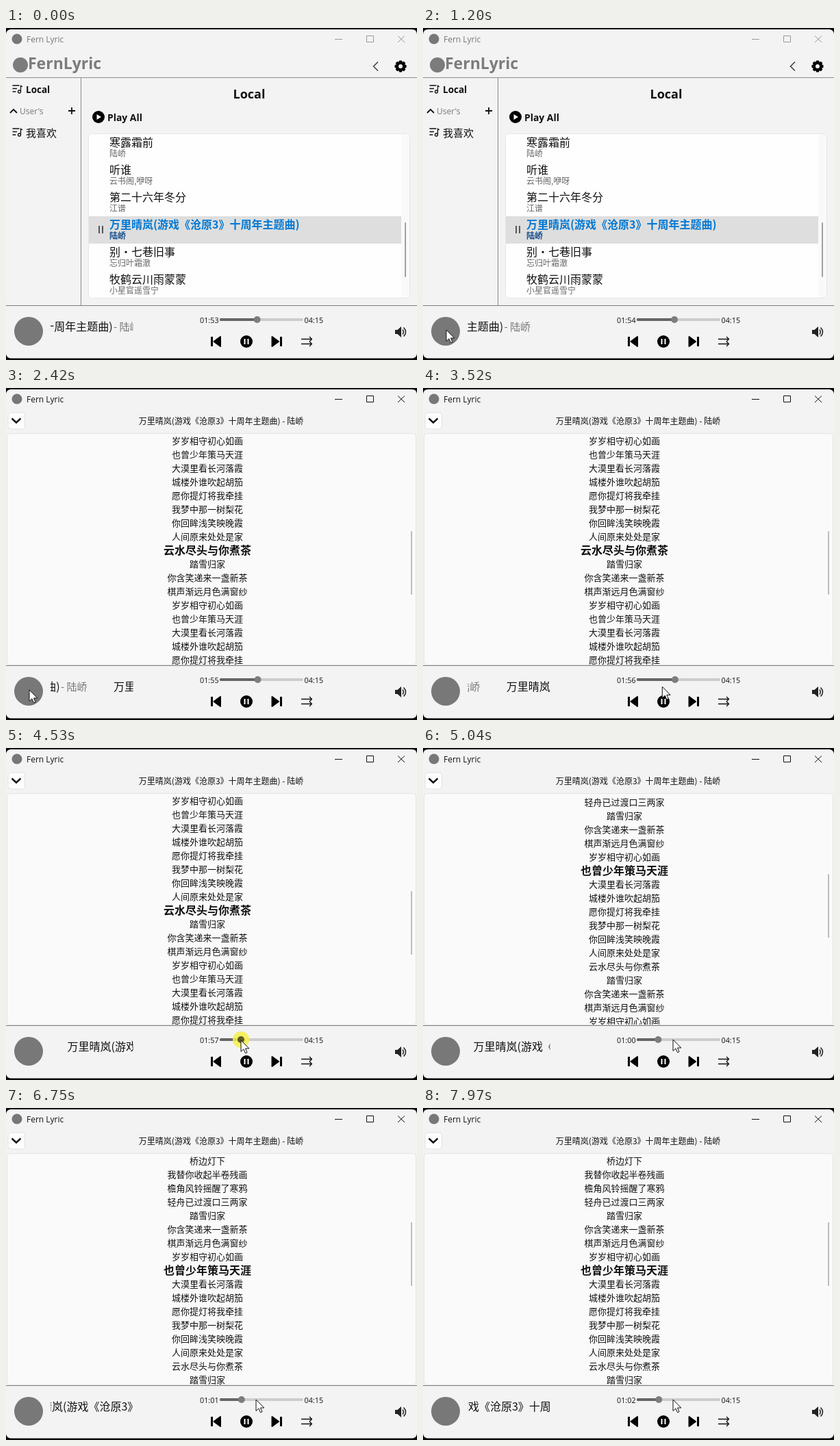
These frames come from a looping animation (600 by 485 pixels, 8000 ms). An HTML page:

```html
<!DOCTYPE html>
<html lang="zh">
<head>
<meta charset="utf-8">
<title>Fern Lyric</title>
<style>
html, body { margin: 0; width: 100%; height: 100%; overflow: hidden; background: #0b0b0b; }
svg { display: block; width: 600px; height: 485px; }
text { font-family: "Open Sans", "Noto Sans CJK SC", "Noto Sans CJK", sans-serif; fill: #111; white-space: pre; }
.cjk { font-family: "Noto Sans CJK SC", "Noto Sans CJK", sans-serif; }
.b { font-weight: 700; }
.mid { text-anchor: middle; }
.line { fill: none; stroke: #111; stroke-width: 1.3; }
</style>
</head>
<body>
<svg viewBox="0 0 600 485">
  <defs>
    <clipPath id="lyricClip"><rect x="1" y="67" width="598" height="337"/></clipPath>
    <clipPath id="nameClip"><rect x="65" y="422" width="120.500" height="34"/></clipPath>
    <g id="listIcon">
      <path class="line" d="M0 1H10M0 5.500H6.500M0 10H5M12 9.500V0.500Q12 2.500 14.500 2.500"/>
      <circle class="line" cx="10" cy="10" r="2"/>
    </g>
  </defs>

  <rect y="2" width="600" height="480.500" rx="7" fill="#f3f3f3"/>
  <circle cx="16" cy="16" r="7.500" fill="#777"/>
  <text id="caption" x="30" y="21" font-size="12">Fern Lyric</text>
  <path id="winBtns" fill="none" d="M480 16.500H491M526.500 11.500H536.500V20.500H526.500ZM572 11.500L582 21M582 11.500L572 21"/>

  <g id="home">
    <circle cx="21" cy="54" r="11" fill="#7c7c7c"/>
    <text x="32" y="60" font-size="23" class="b" style="fill:#7c7c7c">FernLyric</text>
    <path d="M543 49.500L536.500 56L543 62.500" fill="none" stroke="#444" stroke-width="1.600"/>
    <g id="gear" transform="translate(576 56)"></g>
    <path d="M0 72.500H600M109.500 72.500V405" fill="none" stroke="#8c8c8c"/>

    <use href="#listIcon" x="9.500" y="83"/>
    <text x="29" y="95" font-size="13.500" class="b">Local</text>
    <path d="M6 124L11 119L16 124" fill="none" stroke="#111" stroke-width="1.800"/>
    <text x="20" y="126" font-size="12" style="fill:#777">User's</text>
    <path d="M91 121H101M96 116V126" stroke="#111" stroke-width="1.800"/>
    <use href="#listIcon" x="9.500" y="146"/>
    <text x="29" y="158.500" font-size="15" class="cjk" font-weight="500">我喜欢</text>

    <text x="355" y="103" font-size="18" class="b mid">Local</text>
    <circle cx="135" cy="130" r="9"/>
    <path d="M132.500 126V134L139 130Z" fill="#fff"/>
    <text x="148" y="136" font-size="13.900" class="b">Play All</text>
    <rect x="120.500" y="154.500" width="469" height="240" rx="4" fill="#fefefe" stroke="#e6e6e6"/>
    <rect x="577" y="155" width="12" height="239" rx="3" fill="#f9f9f9"/>
    <rect x="121" y="275" width="456" height="40" fill="#dedede"/>
    <path d="M136 289V300M141 289V300" stroke="#555" stroke-width="2"/>
    <g id="songs"></g>
    <rect x="582" y="284" width="2" height="80" rx="1" fill="#a0a0a0"/>
  </g>

  <g id="lyricPage">
    <rect x="3" y="36" width="24.500" height="24" rx="4" fill="#fdfdfd" stroke="#dcdcdc" stroke-width=".8"/>
    <path d="M8.500 44.500L15 50.500L21.500 44.500" fill="none" stroke="#111" stroke-width="2.400"/>
    <text id="heading" x="314" y="52.500" font-size="12" class="cjk mid"></text>
    <rect x="1.500" y="66.500" width="597" height="338" rx="4" fill="#fafafa" stroke="#e4e4e4"/>
    <g id="rows" clip-path="url(#lyricClip)"></g>
    <rect id="thumb" x="591" width="2" height="93" rx="1" fill="#bcbcbc"/>
  </g>

  <path d="M0 405.500H600" stroke="#7c7c7c"/>
  <circle cx="33" cy="443" r="21" fill="#787878"/>
  <g clip-path="url(#nameClip)"><g id="names"></g></g>

  <text id="now" x="283" y="430.500" font-size="10.800"></text>
  <text x="435.500" y="430.500" font-size="10.800">04:15</text>
  <rect x="312" y="424" width="122" height="4" rx="1.500" fill="#cdcdcd"/>
  <rect id="fill" x="312" y="424" height="4" rx="1.500" fill="#666"/>
  <circle id="spot" r="12" fill="#f6ee4a" opacity=".85"/>
  <circle id="knob" cy="426" r="5" fill="#7d7d7d"/>

  <g stroke="#000" stroke-linejoin="round">
    <path d="M300.500 451V465" stroke-width="3"/>
    <path d="M313 451V465L303.500 458Z" stroke-width="2"/>
    <path d="M388.500 451V465L398 458Z" stroke-width="2"/>
    <path d="M401.500 451V465" stroke-width="3"/>
  </g>
  <circle cx="351" cy="458" r="9"/>
  <path d="M348.500 454V462M353.500 454V462" stroke="#fff" stroke-width="2"/>
  <path class="line" d="M431 454.500H446.500M443 451L446.500 454.500L443 458M431 461.500H446.500M443 458L446.500 461.500L443 465"/>
  <path d="M568 441H571.500L577 436V452L571.500 447H568Z" fill="#222"/>
  <path d="M579 440.500Q581.500 444 579 447.500M580.500 437.500Q586.500 444 580.500 450.500" fill="none" stroke="#222" stroke-width="1.500"/>
  <path id="cursor" d="M0 0V16.500L3.900 12.900L6.500 18.800L9 17.700L6.500 12H11.800Z" fill="#fff" stroke="#111" stroke-width="1"/>
</svg>
<script>
const LOOP = 8000;
const song = "万里晴岚(游戏《沧原3》十周年主题曲)";
const singer = "陆峤";
const songs = [
  ["寒露霜前", singer], ["听谁", "云书阁,咿呀"], ["第二十六年冬分", "江谱"],
  [song, singer], ["别·七巷旧事", "忘归叶霜澈"], ["牧鹤云川雨蒙蒙", "小星官遥雪宁"]
];
const lyrics = ["桥边灯下", "我替你收起半卷残画", "檐角风铃摇醒了寒鸦", "轻舟已过渡口三两家",
  "踏雪归家", "你含笑递来一盏新茶", "棋声渐远月色满窗纱", "岁岁相守初心如画",
  "也曾少年策马天涯", "大漠里看长河落霞", "城楼外谁吹起胡笳", "愿你提灯将我牵挂",
  "我梦中那一树梨花", "你回眸浅笑映晚霞", "人间原来处处是家", "云水尽头与你煮茶"];
const REFRAIN = 12, ROWS = 26;

// Pointer path: time, x, y
const path = [[300, 30, 500], [550, 30, 484], [950, 34, 441], [3150, 34, 441], [3420, 326, 445],
  [3640, 372, 428], [4230, 370, 427], [4430, 343, 427], [4750, 343, 427], [5040, 365, 426]];
// Clock ticks: time, seconds played
const ticks = [[0, 113], [800, 114], [1850, 115], [2850, 116], [3850, 117], [4930, 60], [6240, 61], [7250, 62]];
const SWITCH = 1500, FOCUS = 1300, GRAB = 4320, SEEK = 4930;

const $ = id => document.getElementById(id);
function make(parent, tag, attrs, content = "") {
  const el = document.createElementNS("http://www.w3.org/2000/svg", tag);
  set(el, attrs);
  el.textContent = content;
  parent.appendChild(el);
  return el;
}
function set(el, attrs) {
  for (const k in attrs) el.setAttribute(k, attrs[k]);
}
const show = (el, on) => { el.style.display = on ? "" : "none"; };
const within = (t, a, b) => t >= a && t < b;

songs.forEach(([title, by], i) => {
  const on = i === 3, cls = on ? "cjk b" : "cjk", y = 173 + 40 * i;
  make($("songs"), "text", { x: 151, y, "font-size": 16, class: cls, style: on ? "fill:#0078d4" : "" }, title);
  make($("songs"), "text", { x: 151, y: y + 15, "font-size": 12, class: cls, style: on ? "fill:#174f8c" : "fill:#666" }, by);
});

for (let i = 0; i < 8; i++)
  make($("gear"), "rect", { x: -2.2, y: -8.5, width: 4.4, height: 5, rx: 1, transform: `rotate(${i * 45})` });
make($("gear"), "circle", { r: 5, fill: "none", stroke: "#000", "stroke-width": 4 });

$("heading").textContent = `${song} - ${singer}`;
for (const x of [-354, 0]) {
  make($("names"), "text", { x, y: 442, "font-size": 16, class: "cjk" }, song);
  make($("names"), "text", { x: x + 277, y: 442, "font-size": 15, class: "cjk", style: "fill:#777" }, "- " + singer);
}

const rows = Array.from({ length: ROWS }, (_, i) =>
  make($("rows"), "text", { x: 294, class: "cjk mid" }, lyrics[i < lyrics.length ? i : i - REFRAIN]));

function pointer(t) {
  let a = path[0];
  for (const b of path) {
    if (t < b[0]) {
      const u = Math.max(0, (t - a[0]) / (b[0] - a[0] || 1));
      return [a[1] + (b[1] - a[1]) * u, a[2] + (b[2] - a[2]) * u];
    }
    a = b;
  }
  return [a[1], a[2]];
}

function draw(ms) {
  // The picture advances about ten times a second
  const t = Math.floor((ms + 20) / 101) * 100.9;
  const [px, py] = pointer(t);
  const sec = ticks.filter(k => k[0] <= t).pop()[1];

  show($("home"), t < SWITCH);
  show($("lyricPage"), t >= SWITCH);
  const active = t >= FOCUS;
  $("caption").style.fill = active ? "#111" : "#777";
  $("winBtns").setAttribute("stroke", active ? "#111" : "#999");

  $("names").setAttribute("transform", `translate(${157 - (t - 2420) * 0.0318} 0)`);

  const two = n => String(n).padStart(2, "0");
  $("now").textContent = two(Math.floor(sec / 60)) + ":" + two(sec % 60);
  const drag = within(t, GRAB, SEEK);
  const kx = drag ? Math.max(343, px) : 317 + 112 * sec / 255;
  set($("knob"), { cx: kx, fill: drag ? "#5f5a20" : "#7d7d7d" });
  $("fill").setAttribute("width", kx - 312);

  const u = Math.min(1, Math.max(0, (t - SEEK) / 450));
  const ease = 1 - (1 - u) ** 3;
  const pos = 15 - 7 * ease, cur = t < SEEK ? 15 : 8;
  rows.forEach((row, i) => {
    const on = i === cur;
    set(row, { y: (on ? 243 : 242) + 20 * (i - pos), "font-size": on ? 16 : 13, "font-weight": on ? 700 : 400 });
  });
  $("thumb").setAttribute("y", 209 - 42 * ease);

  set($("spot"), { cx: px, cy: py - 1 });
  show($("spot"), within(t, FOCUS, SWITCH) || within(t, GRAB, 4800));
  $("cursor").setAttribute("transform", `translate(${px} ${py})`);
}

const start = performance.now();
function frame() {
  draw((performance.now() - start) % LOOP);
  requestAnimationFrame(frame);
}
draw(0);
requestAnimationFrame(frame);
</script>
</body>
</html>
```
